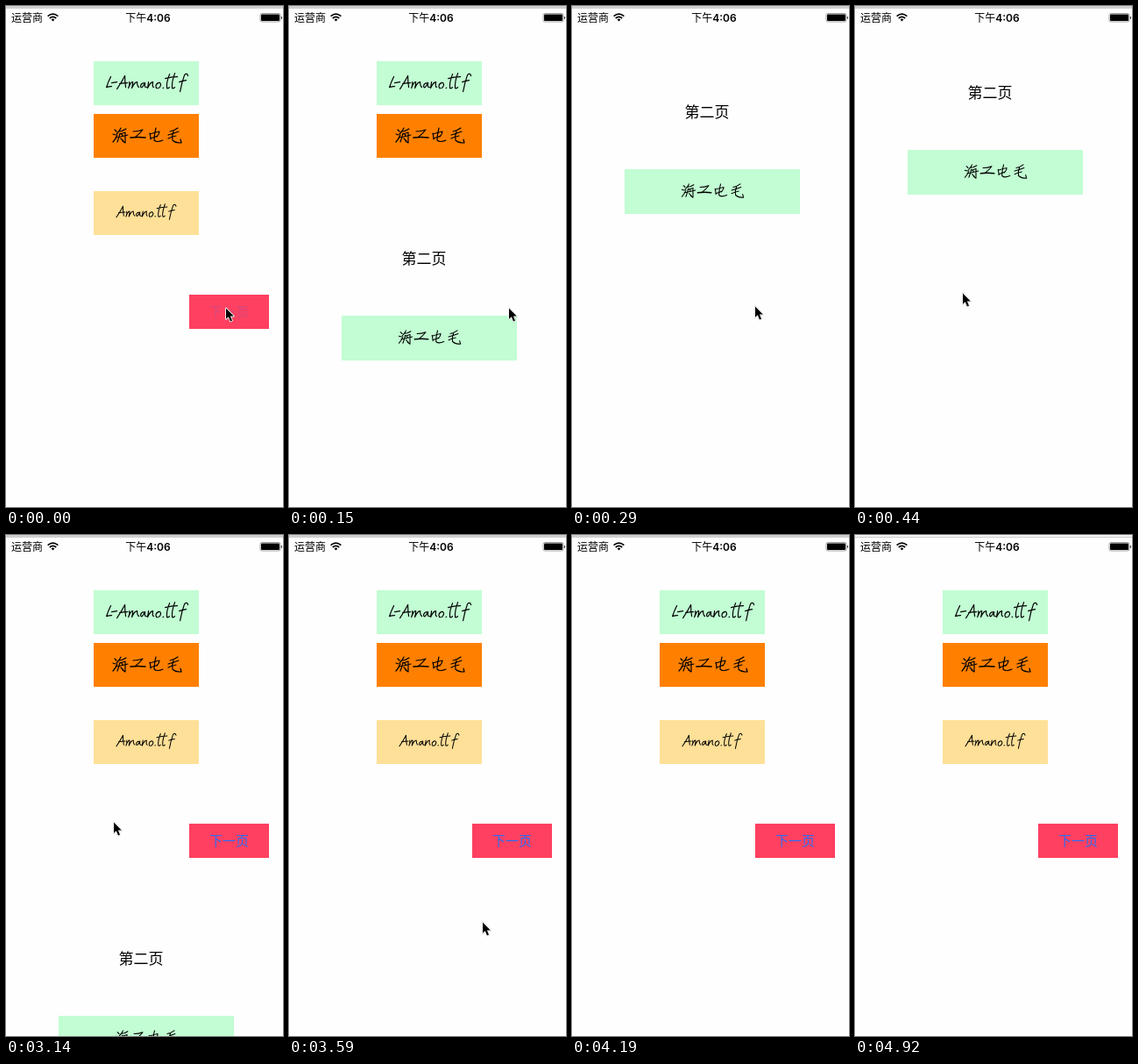
Animation of 316x571 px, one loop 5020 ms. Source, as an HTML page:

```html
<!DOCTYPE html>
<html lang="zh-CN">
<head>
<meta charset="utf-8">
<title>第二页</title>
<style>
  html, body { margin: 0; width: 100%; height: 100%; overflow: hidden; background: #fefefe; }
  svg { display: block; width: 316px; height: 571px; }
  text { font-family: Inter, "Noto Sans CJK SC", "Noto Sans CJK JP", "Noto Sans CJK", sans-serif; }
  .pen { fill: none; stroke: #000; stroke-width: 1.2; stroke-linecap: round; stroke-linejoin: round; }
  #cursor { filter: drop-shadow(0 .6px .6px rgba(0, 0, 0, .4)); }
</style>
</head>
<body>
<svg viewBox="0 0 316 571">
  <defs>
    <!-- Handwritten lettering: Latin on a baseline at y = 0, brush characters from the top left -->
    <path id="prefix" class="pen" d="M6-13Q3-7 1-1Q4-2 7-2M7-6L13-7"/>
    <g id="amano" class="pen">
      <path d="M13 1Q19-8 22-14Q22-6 23-1M16-5Q20-6 25-6"/>
      <path d="M27-7Q28-3 26 0Q29-8 31-7Q31-3 30 0Q33-7 36-7Q36-2 38-1"/>
      <path d="M45-6Q40-6 40-2Q41 2 45-6Q44 0 47-1"/>
      <path d="M49-7L48 0Q51-7 54-7Q53-1 55-1"/>
      <path d="M60-6Q56-4 58 0Q62 1 63-4Q62-8 59-5M65.5 0l.5-.4"/>
      <path d="M73-16Q69-6 70 0Q71 1 73-1M79-17Q75-6 76 0Q77 1 79-1M68-11Q75-13 82-13"/>
      <path d="M94-14Q93-18 90-15Q87-7 85 4M84-7Q87-8 92-9"/>
    </g>
    <g id="brush" class="pen">
      <path d="M3 3L5 5M1 8L4 9M1 17Q4 14 6 9M10 1Q9 4 5 8M7 5Q12 5 16 2"/>
      <path d="M9 7Q8 12 6 17M9 8L15 6Q15 12 15 18L12 16M4 12Q11 11 18 9M11 8L12 10M10 13L13 16"/>
      <path d="M24 5Q30 5 35 3Q32 7 27 11"/>
      <path stroke-width="1.7" d="M21 12Q30 11 38 12"/>
      <path d="M43 7Q44 10 44 14M43 8Q49 6 54 5Q54 8 51 11M44 13L52 10"/>
      <path d="M50 1Q48 9 48 15Q51 18 58 15"/>
      <path d="M75 1Q71 4 66 5M64 9Q71 7 76 5M64 13Q68 11 73 10M70 5Q68 10 69 15Q72 18 79 18L78 14"/>
    </g>
  </defs>

  <rect width="316" height="571" fill="#fefefe"/>

  <g id="home">
    <rect x="100" y="63" width="120" height="50" fill="#c2fdd3"/>
    <g transform="translate(113.6 93.6)" role="img" aria-label="L-Amano.ttf">
      <use href="#prefix"/>
      <use href="#amano"/>
    </g>
    <rect x="100" y="123" width="120" height="50" fill="#ff8000"/>
    <use href="#brush" x="121" y="138"/>
    <rect x="100" y="211" width="120" height="50" fill="#ffe098"/>
    <use href="#amano" transform="translate(115 240) scale(.84)"/>
    <rect x="209" y="329" width="91" height="39" fill="#ff4060"/>
    <text id="next" x="254.5" y="354" font-size="15" text-anchor="middle" fill="#2a6cf4">下一页</text>
  </g>

  <g id="sheet">
    <rect width="316" height="571" fill="#fefefe"/>
    <text x="154" y="102.5" font-size="17" text-anchor="middle">第二页</text>
    <rect x="60" y="162" width="200" height="51" fill="#c2fdd3"/>
    <use href="#brush" transform="translate(124.5 178) scale(.9)"/>
  </g>

  <g id="status">
    <text x="6" y="17.5" font-size="12">运营商</text>
    <g fill="none" stroke="#000" stroke-width="1.7">
      <path d="M47.6 11.6Q53.5 6.8 59.4 11.6M49.8 14Q53.5 10.8 57.2 14"/>
      <path d="M51.6 15.4Q53.5 13.8 55.4 15.4L53.5 17.6Z" fill="#000" stroke="none"/>
    </g>
    <text x="162" y="17.5" font-size="12" font-weight="600" text-anchor="middle"><tspan font-weight="500">下午</tspan>4:06</text>
    <rect x="290" y="8.5" width="23" height="9.5" rx="2" fill="#fefefe" stroke="#777" stroke-width=".7"/>
    <rect x="291" y="9.5" width="21" height="7.5" rx="1"/>
    <path d="M313.8 11.4Q316 13.3 313.8 15.2Z"/>
  </g>

  <g id="edge">
    <rect id="edgeFill" width="316" height="2"/>
    <rect y="2" width="316" height="1" fill="#cbcbcb"/>
  </g>

  <path id="cursor" d="M2 1.4V13.8L4.8 11.2L7 16.4L9 15.5L6.9 10.6H10.8Z"
        fill="#000" stroke="#fff" stroke-width="1.8" stroke-linejoin="round" paint-order="stroke"/>
</svg>
<script>
  const LOOP = 5020, HIDDEN = 571;
  const el = id => document.getElementById(id);

  // Each track lists [start time, value]; values hold until the next entry.
  const sheetTop = [[0, HIDDEN], [150, 191], [290, 24], [440, 2], [590, 0], [3140, 386], [3290, HIDDEN]];
  const cursorAt = [
    [0, [249, 343]], [290, [207, 341]], [440, [121, 326]], [3590, [219, 440]],
    [3740, [258, 498]], [3890, [241, 537]], [4040, [221, 561]], [4190, null]
  ];
  const nextOpacity = [[0, 0.2], [150, 1]];
  const edgeColor = [[0, "#d0d0d0"], [4920, "#f5f5f5"]];

  const valueAt = (track, t) => track.findLast(([start]) => start <= t)[1];

  function render(t) {
    el("sheet").setAttribute("transform", `translate(0 ${valueAt(sheetTop, t)})`);
    el("next").setAttribute("opacity", valueAt(nextOpacity, t));
    el("edgeFill").setAttribute("fill", valueAt(edgeColor, t));
    const pos = valueAt(cursorAt, t);
    el("cursor").setAttribute("visibility", pos ? "visible" : "hidden");
    if (pos) el("cursor").setAttribute("transform", `translate(${pos})`);
  }

  let begin;
  function tick(now) {
    begin ??= now;
    render((now - begin) % LOOP);
    requestAnimationFrame(tick);
  }
  render(0);
  requestAnimationFrame(tick);
</script>
</body>
</html>
```
